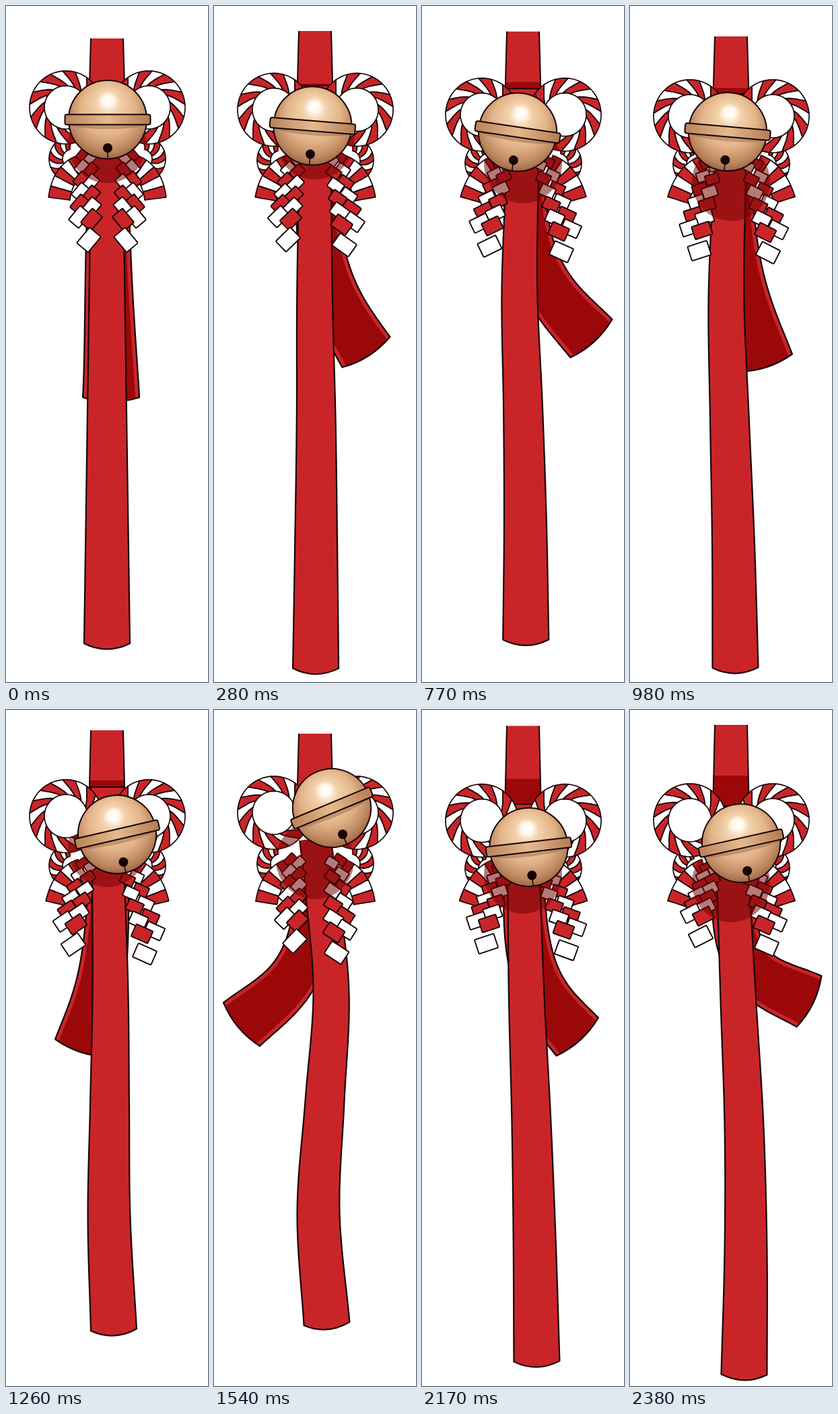
An HTML page with a canvas for the animation above (2.45 s loop, 300 by 1000 pixels).

```html
<!DOCTYPE html>
<html lang="en">
<head>
<meta charset="utf-8">
<title>Swinging shrine bell</title>
<style>
html, body { margin: 0; width: 100%; height: 100%; overflow: hidden; background: #fff; }
canvas { display: block; }
</style>
</head>
<body>
<canvas id="stage" width="300" height="1000"></canvas>
<script>
const c = document.getElementById('stage').getContext('2d');
const RED = '#c92529', DARK = '#9b080a', INK = '#170506', WHITE = '#fff';
const LOOP = 2450, STEP = 70;

// Smooth curve through values vs at positions ts
function spline(ts, vs, t) {
  const last = ts.length - 1;
  let i = 0;
  while (i < last - 1 && t > ts[i + 1]) i++;
  const slope = k => {
    const a = Math.max(0, k - 1), b = Math.min(last, k + 1);
    return (vs[b] - vs[a]) / (ts[b] - ts[a]);
  };
  const h = ts[i + 1] - ts[i], u = (t - ts[i]) / h, v = 1 - u;
  return vs[i] * (1 + 2 * u) * v * v + slope(i) * h * u * v * v
    + vs[i + 1] * u * u * (3 - 2 * u) - slope(i + 1) * h * u * u * v;
}

const TIMES = [0, 560, 980, 1260, 1540, 1890, 2380];
const POSE = {
  bellX: [151, 143, 145, 165, 175, 154, 165],
  bellY: [168, 185, 186, 184, 145, 202, 197],
  bellTurn: [0, 8, 5, -13, -22.5, -2.5, -12.6],
  drop: [0, 7, 13, 7, 2, 13, 13],
  shadeEnd: [262, 260, 318, 262, 280, 286, 314],
  shadeTop: [130, 105, 121, 104, 130, 110, 97],
  knot: [125, 114, 130, 114, 125, 135, 142],
  tailX: [156, 273, 201, 113, 41, 174, 266],
  tailY: [579, 466, 528, 500, 465, 533, 431],
  tailTurn: [0, 54, 18, -18, -50, 10, 64],
  leftX: [123, 100, 103, 100, 120, 89, 105],
  leftY: [346, 347, 362, 347, 342, 356, 335],
  leftTurn: [-50, -37, -18, -34, -46, -13, -27],
  rightX: [178, 206, 205, 206, 182, 222, 203],
  rightY: [346, 360, 365, 361, 359, 363, 348],
  rightTurn: [50, 24, 27, 24, 33, 17, 24]
};
// Sideways bend of the long ribbon, top to bottom
const BEND = [
  [150, 150, 148, 152, 158, 150, 153],
  [150, 148.5, 143, 155, 174, 152, 161],
  [150, 152.5, 148, 154, 164.5, 155.5, 169.5],
  [150, 153, 153.5, 153, 155, 161, 172],
  [150, 152.5, 156.5, 160, 167.5, 171, 169.5]
];
const TOP = [[0, 560, 980, 1120, 1260, 1540, 1890, 2240, 2380], [48, 30, 45, 25, 30, 35, 35, 21, 22]];
const BOTTOM = [[0, 210, 560, 1050, 1120, 1260, 1540, 1890, 2240, 2310, 2380],
  [943, 990, 914, 989, 980, 917, 908, 940, 970, 981, 983]];

const rad = d => d * Math.PI / 180;
const mix = (a, b, u) => a + (b - a) * u;

function ink(fill, width = 2) {
  if (fill) { c.fillStyle = fill; c.fill(); }
  c.strokeStyle = INK;
  c.lineWidth = width;
  c.stroke();
}

function trace(points) {
  c.beginPath();
  points.forEach(p => c.lineTo(p[0], p[1]));
}

// Point at distance d to the side of path p
function beside(p, t, d) {
  const a = p(t - .001), b = p(t + .001), m = p(t);
  const dx = b[0] - a[0], dy = b[1] - a[1], n = Math.hypot(dx, dy);
  return [m[0] + dy / n * d, m[1] - dx / n * d];
}

function ribbon(p, w0, w1, fill, sag, trim) {
  const N = 40, right = [], left = [];
  for (let i = 0; i <= N; i++) {
    const t = i / N, w = mix(w0, w1, t) / 2;
    right.push(beside(p, t, w));
    left.push(beside(p, t, -w));
  }
  const a = p(.99), b = p(1), n = Math.hypot(b[0] - a[0], b[1] - a[1]);
  const tip = [b[0] + (b[0] - a[0]) / n * sag, b[1] + (b[1] - a[1]) / n * sag];
  const end = left[N];
  trace(right);
  c.quadraticCurveTo(tip[0], tip[1], end[0], end[1]);
  left.reverse().forEach(q => c.lineTo(q[0], q[1]));
  c.lineJoin = 'round';
  c.fillStyle = fill;
  c.fill();
  if (trim) {
    c.save();
    c.clip();
    c.strokeStyle = RED;
    c.lineWidth = 12;
    const shape = [right, left];
    shape.forEach(side => { trace(side); c.stroke(); });
    c.restore();
    trace(right);
    c.quadraticCurveTo(tip[0], tip[1], end[0], end[1]);
    left.forEach(q => c.lineTo(q[0], q[1]));
  }
  ink(null, 2.2);
}

// Twisted red and white cord along path p
function cord(p, count, width, skew, first = 0) {
  for (let i = 0; i < count; i++) {
    const edge = (k, s) => beside(p, (k + skew * (s + .25 * (1 - s * s))) / count, s * width / 2);
    const pts = [];
    for (let s = -1; s <= 1.01; s += .25) pts.push(edge(i, s));
    for (let k = .25; k < 1; k += .25) pts.push(edge(i + k, 1));
    for (let s = 1; s >= -1.01; s -= .25) pts.push(edge(i + 1, s));
    for (let k = .75; k > 0; k -= .25) pts.push(edge(i + k, -1));
    trace(pts);
    c.closePath();
    ink((i + first) % 2 ? WHITE : RED, 1.7);
  }
}

const arc = (x, y, r, from, to) => t => {
  const a = rad(mix(from, to, t));
  return [x + r * Math.cos(a), y + r * Math.sin(a)];
};

function bow(drop) {
  const y = 226 + drop * .6, endX = 79 - drop * .6;
  cord(arc(98, y, 24, 270, 85), 9, 20, .6);
  const stub = t => [
    mix(mix(112, 84, t), mix(84, endX, t), t),
    mix(mix(236, 246, t), mix(246, 285 + drop * .15, t), t)
  ];
  cord(stub, 5, 32, 0);
  cord(arc(89, 150 + drop, 43, 0, 360), 18, 22, -.75);
}

function mirrored(draw) {
  c.save();
  c.translate(301, 0);
  c.scale(-1, 1);
  draw();
  c.restore();
}

function paper(x, y, turn, size, fill) {
  c.save();
  c.translate(x, y);
  c.rotate(rad(turn));
  c.beginPath();
  c.roundRect(-15 * size, -11 * size, 30 * size, 22 * size, 1.5);
  ink(fill, 1.9);
  c.restore();
}

// Folded paper streamer hanging to (x, y)
function streamer(x, y, turn, drop) {
  const rows = 5;
  for (let k = rows; k >= 0; k--) {
    const u = k / rows, size = mix(.9, .6, u);
    const mx = mix(x - 5, 120, u), my = mix(y - 32, 222 + drop, u);
    paper(mx - 10 * size, my - 2, turn, size, k % 2 ? RED : WHITE);
    paper(mx + 10 * size, my + 2, turn, size, k % 2 ? WHITE : RED);
  }
  paper(x, y, turn, 1, WHITE);
}

function bell(x, y, turn) {
  c.save();
  c.translate(x, y);
  c.rotate(rad(turn));
  const g = c.createRadialGradient(1, -31, 0, 0, -8, 68);
  g.addColorStop(0, '#fff');
  g.addColorStop(.12, '#fff8ec');
  g.addColorStop(.25, '#f3d2ac');
  g.addColorStop(.6, '#e2b387');
  g.addColorStop(.85, '#bd8760');
  g.addColorStop(1, '#98623f');
  c.beginPath();
  c.arc(0, 0, 58, 0, 7);
  ink(g);
  c.fillStyle = 'rgba(125,70,40,.35)';
  c.beginPath();
  c.ellipse(0, 7, 55, 7, 0, 0, Math.PI);
  c.fill();
  const band = c.createLinearGradient(-63, 0, 63, 0);
  band.addColorStop(0, '#b98359');
  band.addColorStop(.5, '#e6ba8e');
  band.addColorStop(1, '#b47c53');
  c.beginPath();
  c.roundRect(-63.5, -7.5, 127, 15, 3);
  ink(band);
  c.beginPath();
  c.arc(0, 42, 7, 0, 7);
  c.fillStyle = INK;
  c.fill();
  c.beginPath();
  c.moveTo(0, 42);
  c.lineTo(0, 58);
  ink(null, 1.6);
  c.restore();
}

function draw(time) {
  const s = {};
  for (const key in POSE) s[key] = spline(TIMES, POSE[key], time);
  const top = spline(...TOP, time), bottom = spline(...BOTTOM, time);
  c.clearRect(0, 0, 300, 1000);

  // Short tail behind
  const a = rad(s.tailTurn);
  const hx = s.tailX - 70 * Math.sin(a), hy = s.tailY - 70 * Math.cos(a);
  const bez = (p, q, r, e, t) => {
    const v = 1 - t;
    return p * v * v * v + 3 * q * v * v * t + 3 * r * v * t * t + e * t * t * t;
  };
  ribbon(t => [bez(152, 150, hx, s.tailX, t), bez(250, 400, hy, s.tailY, t)], 60, 84, DARK, 13, true);

  // Upper strap
  trace([[126, top], [123, 150], [177, 150], [174, top]]);
  c.fillStyle = RED;
  c.fill();
  c.fillStyle = DARK;
  c.fillRect(124, s.shadeTop, 52, 150 - s.shadeTop);
  c.beginPath();
  c.moveTo(126, top);
  c.lineTo(123, 150);
  c.moveTo(174, top);
  c.lineTo(177, 150);
  ink();
  c.beginPath();
  c.rect(126, s.knot, 49, 40);
  ink(RED);

  bow(s.drop);
  mirrored(() => bow(s.drop));

  // Long ribbon in front
  const xs = BEND.map(row => spline(TIMES, row, time));
  const ys = [0, 1, 2, 3, 4].map(k => mix(250, bottom, k / 4));
  ribbon(t => {
    const y = mix(190, bottom, t);
    return [y < 250 ? mix(150, xs[0], (y - 190) / 60) : spline(ys, xs, y), y];
  }, 46, 68, RED, 17);

  streamer(s.leftX, s.leftY, s.leftTurn, s.drop);
  mirrored(() => streamer(301 - s.rightX, s.rightY, -s.rightTurn, s.drop));

  // Bell shadow falls only on what is already drawn
  c.globalCompositeOperation = 'source-atop';
  c.fillStyle = 'rgba(113,0,0,.52)';
  c.beginPath();
  c.arc(150, s.shadeEnd - 58, 58, 0, 7);
  c.fill();
  c.globalCompositeOperation = 'source-over';

  bell(s.bellX, s.bellY, s.bellTurn);
}

function tick() {
  draw(Math.floor(performance.now() % LOOP / STEP) * STEP);
  requestAnimationFrame(tick);
}
tick();
</script>
</body>
</html>
```
